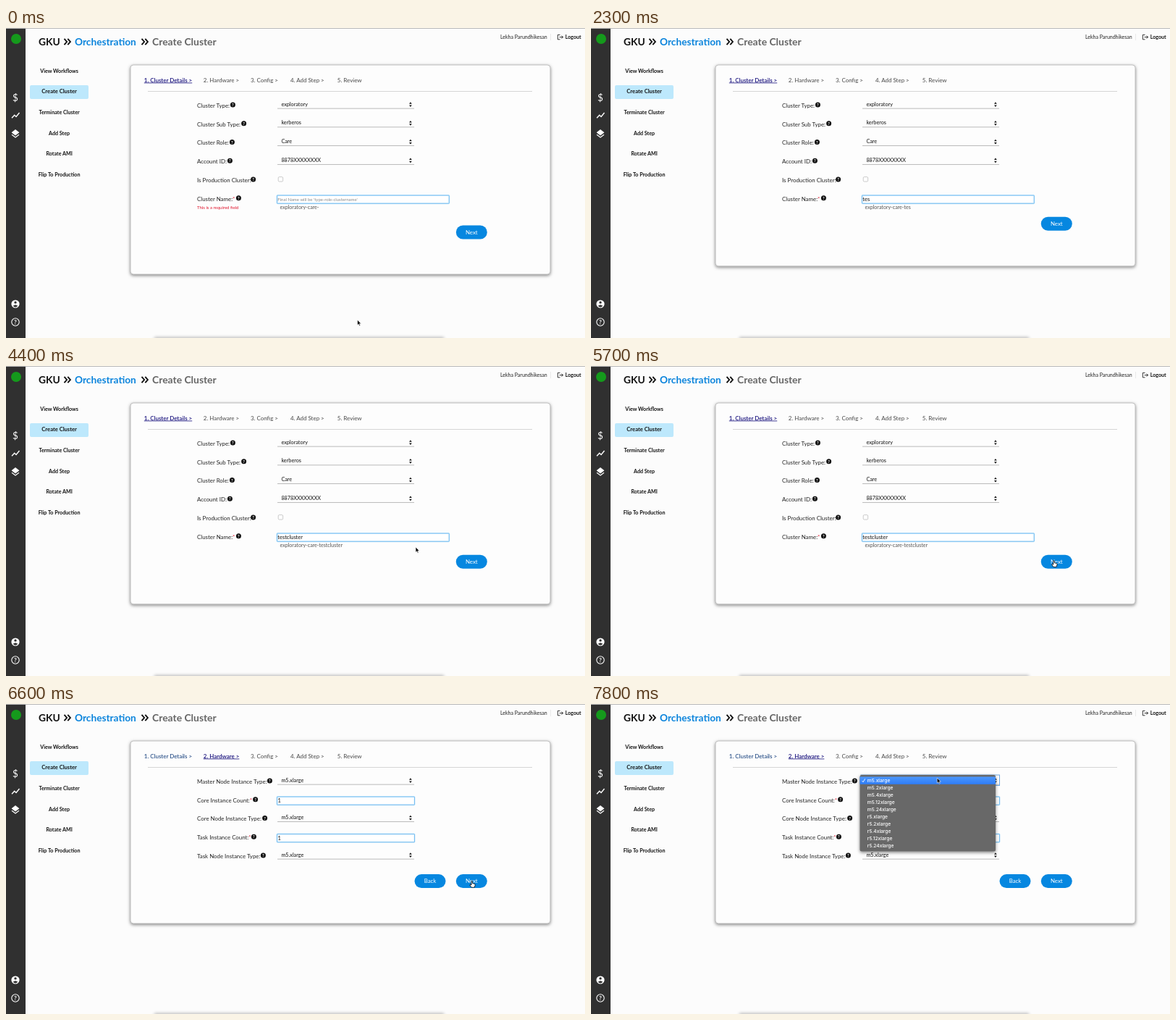
An HTML page that plays this animation: 800 px wide and 428 px high, repeating every 8 s.

```html
<!DOCTYPE html>
<html lang="en">
<head>
<meta charset="utf-8">
<title>Create Cluster</title>
<style>
html, body { margin: 0; width: 100%; height: 100%; overflow: hidden; background: #fcfcfc; }
svg { display: block; width: 800px; height: 428px; }
text { font-family: Lato, sans-serif; white-space: pre; }
</style>
</head>
<body>
<svg id="stage" viewBox="0 0 800 428" xmlns="http://www.w3.org/2000/svg">
  <defs>
    <filter id="shadow" x="-5%" y="-10%" width="110%" height="120%">
      <feDropShadow dx="0" dy="1.5" stdDeviation="2.2" flood-color="#000" flood-opacity=".5"/>
    </filter>
    <filter id="soft" x="-10%" y="-300%" width="120%" height="700%"><feGaussianBlur stdDeviation="2"/></filter>
    <linearGradient id="pick" x2="0" y2="1">
      <stop stop-color="#4b97fc"/><stop offset="1" stop-color="#2f7df6"/>
    </linearGradient>
  </defs>
</svg>
<script>
const LOOP = 8000, STEP = 100, PITCH = 25.75;
const NS = 'http://www.w3.org/2000/svg';
const stage = document.getElementById('stage');

function add(parent, tag, attrs = {}, content) {
  const el = document.createElementNS(NS, tag);
  for (const k in attrs) el.setAttribute(k, attrs[k]);
  if (content !== undefined) el.textContent = content;
  parent.appendChild(el);
  return el;
}
const group = (parent = stage) => add(parent, 'g');
const rect = (p, x, y, width, height, fill, more) => add(p, 'rect', { x, y, width, height, fill, ...more });
const path = (p, d, more) => add(p, 'path', { d, ...more });
const text = (p, x, y, size, fill, str, more) => add(p, 'text', { x, y, 'font-size': size, fill, ...more }, str);
const show = (el, on) => el.setAttribute('display', on ? 'inline' : 'none');
const BOLD = { 'font-weight': 700 };
const MID = { 'text-anchor': 'middle' };

// Page frame
function drawSidebar() {
  const g = group();
  rect(g, 0, 0, 27, 428, '#303030');
  add(g, 'circle', { cx: 14, cy: 15, r: 7, fill: '#159a1c' });
  text(g, 13, 100.5, 13.5, '#fff', '$', MID);
  path(g, 'M8 124.2L11.7 120.2 14 122.4 18.5 117', { fill: 'none', stroke: '#fff', 'stroke-width': 1.4 });
  path(g, 'M13 140L18.4 144.2 13 148.4 7.6 144.2Z', { fill: '#fff' });
  path(g, 'M8 147.2L13 151 18 147.2', { fill: 'none', stroke: '#fff', 'stroke-width': 1.2 });
  add(g, 'circle', { cx: 13, cy: 381, r: 5.6, fill: '#fff' });
  add(g, 'circle', { cx: 13, cy: 378.9, r: 1.7, fill: '#303030' });
  path(g, 'M9.7 383.8Q13 380.6 16.3 383.8Q13 387 9.7 383.8Z', { fill: '#303030' });
  add(g, 'circle', { cx: 13, cy: 406, r: 5.2, fill: 'none', stroke: '#fff', 'stroke-width': 1.1 });
  text(g, 13, 409, 8.4, '#fff', '?', { ...MID, ...BOLD });
}

function drawHeader() {
  const g = group();
  rect(g, 0, 0, 800, 1, '#b9b9b9');
  rect(g, 205, 427, 400, 4, '#000', { opacity: .3, filter: 'url(#soft)' });
  text(g, 45, 23.6, 13.8, '#111', 'GKU', BOLD);
  text(g, 95, 23.6, 13.7, '#0b84dc', 'Orchestration', BOLD);
  text(g, 202, 23.6, 13.9, '#666', 'Create Cluster', BOLD);
  for (const x of [80.5, 187.5])
    path(g, `M${x} 14.8l3.6 4.2-3.6 4.2m4.8-8.4l3.6 4.2-3.6 4.2`, { fill: 'none', stroke: '#111', 'stroke-width': 1.9 });
  text(g, 683, 14.9, 7, '#222', 'Lekha Parundhikesan');
  rect(g, 752, 8, .6, 9, '#ddd');
  path(g, 'M765.5 9.4H762.3V15.8H765.5M764.6 12.6H769.4M767.6 10.6L769.6 12.6 767.6 14.6', { fill: 'none', stroke: '#222', 'stroke-width': .9 });
  text(g, 772.8, 14.9, 7.1, '#111', 'Logout', BOLD);

  rect(g, 33, 79, 81, 19, '#bde8fc', { rx: 2 });
  ['View Workflows', 'Create Cluster', 'Terminate Cluster', 'Add Step', 'Rotate AMI', 'Flip To Production']
    .forEach((s, i) => text(g, 73.6, 61.8 + i * 28.6, i === 1 ? 7.6 : 7.15, '#111', s, { ...MID, ...BOLD }));
}

// Form parts
function label(g, row, str, iconX, required) {
  const y = 109.9 + row * PITCH;
  const el = text(g, 264, y, 7.9, '#222', str);
  if (required) add(el, 'tspan', { fill: '#e0142c' }, '*');
  add(g, 'circle', { cx: iconX, cy: y - 3.8, r: 3.5, fill: '#111' });
  text(g, iconX, y - 1.7, 5.8, '#fff', '?', { ...MID, ...BOLD });
}
function select(g, row, str) {
  const y = 105 + row * PITCH;
  text(g, 380.4, y + 2.7, 7.25, '#111', str);
  rect(g, 375, y + 5.7, 189, .8, '#aaa');
  path(g, `M557 ${y - .2}l1.9-2.6 1.9 2.6zm0 1.6l1.9 2.6 1.9-2.6z`, { fill: '#111' });
}
function input(g, row, width) {
  const y = 102.3 + row * PITCH;
  rect(g, 374.5, y, width, 11.2, '#fff', { stroke: '#d3ecfc', 'stroke-width': 2, rx: .8 });
  rect(g, 374.5, y, width, 11.2, 'none', { stroke: '#62b4ee', 'stroke-width': .8, rx: .5 });
}
function button(g, x, str) {
  rect(g, x, -9.5, 43, 19, '#0687e0', { rx: 9.5 });
  text(g, x + 21.5, 2.7, 7.9, '#fff', str, MID);
}

drawSidebar();
drawHeader();
const card = rect(stage, 172, 51, 580, 289, '#fdfdfd', { rx: 4, stroke: '#999', 'stroke-width': .6, filter: 'url(#shadow)' });
rect(stage, 196, 87, 531, .8, '#ccc');

const tabs = [[190.8, '1. Cluster Details >'], [272.8, '2. Hardware >'], [338, '3. Config >'], [393, '4. Add Step >'], [457.8, '5. Review']]
  .map(([x, s]) => text(stage, x, 74.5, 7.95, '#555', s));

// Step one: details
const details = group();
[['Cluster Type:', 313.4, 'exploratory'], ['Cluster Sub Type:', 328.6, 'kerberos'],
 ['Cluster Role:', 312.4, 'Care'], ['Account ID:', 309.4, '8878XXXXXXXX']]
  .forEach(([s, x, value], i) => { label(details, i, s, x); select(details, i, value); });
label(details, 4, 'Is Production Cluster:', 341.6);
rect(details, 376.2, 205.6, 6.4, 6.4, '#fff', { rx: 1.4, stroke: '#b5b5b5', 'stroke-width': .7 });
label(details, 5, 'Cluster Name:', 321.4, true);
input(details, 5, 237.8);
const error = text(details, 264, 250.1, 6, '#e0142c', 'This is a required field');
const hint = text(details, 375.3, 239, 6, '#888', "Final Name will be 'type-role-clustername'");
const typed = text(details, 375.3, 239.2, 7.5, '#111', '');
const finalName = text(details, 378.5, 250, 7.08, '#555', '');
const caret = rect(details, 375, 232.2, .8, 9, '#111');

// Step two: hardware
const hardware = group();
[['Master Node Instance Type:', 364.4], ['Core Instance Count:', 344.6, true], ['Core Node Instance Type:', 357.6],
 ['Task Instance Count:', 342.4, true], ['Task Node Instance Type:', 355.4]]
  .forEach(([s, x, count], i) => {
    label(hardware, i, s, x, count);
    if (count) {
      input(hardware, i, 190);
      text(hardware, 375.6, 110.4 + i * PITCH, 7.5, '#111', '1');
    } else select(hardware, i, 'm5.xlarge');
  });

const buttons = group();
button(buttons, 621.8, 'Next');
const back = group(buttons);
button(back, 564.5, 'Back');

// Open list of instance types
const menu = group();
rect(menu, 373, 98, 191.5, 14.5, 'none', { stroke: '#6ea8e2', 'stroke-width': 1 });
rect(menu, 371.5, 98, 187.5, 105.5, '#686868', { rx: 2.5, filter: 'url(#shadow)' });
rect(menu, 371.5, 100.4, 187.5, 10.4, 'url(#pick)');
path(menu, 'M374.6 106l1.4 1.8 2.6-4.4', { fill: 'none', stroke: '#fff', 'stroke-width': .9 });
['m5', 'r5'].forEach((family, f) => ['', 2, 4, 12, 24].forEach((n, i) =>
  text(menu, 381.8, 108 + (f * 5 + i) * 10.02, 6.7, '#fff', `${family}.${n}xlarge`,
    { style: 'font-family: Inter, sans-serif', 'font-weight': 500 })));

// Mouse pointers
const pointer = group();
const arrow = path(pointer, 'M0 0V7.2L1.7 5.7 2.8 8.2 4 7.7 2.9 5.2H5.1Z', { fill: '#000', stroke: '#fff', 'stroke-width': .6 });
const beam = path(pointer, 'M-1.5 -4.5Q0 -4.5 0 -3.5V3.5Q0 4.5 -1.5 4.5M1.5 -4.5Q0 -4.5 0 -3.5M0 3.5Q0 4.5 1.5 4.5', { fill: 'none', stroke: '#333', 'stroke-width': .7 });
const hand = path(pointer, 'M-.7 .7Q0 -.4 .7 .7V3.4L4 4.4Q4.8 4.8 4.4 6.4L3.6 9.2H-.6L-2.8 6Q-2.8 4.8 -1.8 5.2L-.7 6Z', { fill: '#fff', stroke: '#000', 'stroke-width': .8 });

const TRACK = [[0, 485.5, 403], [700, 391, 237], [900, 391, 237], [1000, 384, 237], [4000, 384, 237],
  [4400, 566, 250], [4900, 638.6, 266.5], [5100, 639.5, 268.2], [6100, 639.5, 268.2],
  [6600, 643.7, 244], [7050, 643.7, 244], [7600, 478.2, 102]];
const KEYS = [[1700, 't'], [1800, 'es'], [2500, 't'], [2700, 'c'], [2900, 'l'], [3100, 'u'],
  [3400, 's'], [3500, 't'], [3700, 'e'], [3800, 'r']];
const CLICK = 900, SUBMIT = 5800, OPEN = 7700;

function pointerAt(t) {
  const i = TRACK.findIndex(k => k[0] > t);
  if (i < 0) return TRACK[TRACK.length - 1].slice(1);
  const [t0, x0, y0] = TRACK[i - 1], [t1, x1, y1] = TRACK[i];
  const u = (t - t0) / (t1 - t0), e = u * u * (3 - 2 * u);
  return [x0 + (x1 - x0) * e, y0 + (y1 - y0) * e];
}

function drawPointer(t, buttonY) {
  const [x, y] = pointerAt(t);
  const onField = t < SUBMIT && x > 374 && x < 613 && y > 230 && y < 243;
  const onNext = x > 622 && x < 665 && Math.abs(y - buttonY) < 10;
  pointer.setAttribute('transform', `translate(${x} ${y})`);
  show(pointer, t < 1300 || t >= 4100);
  show(beam, onField);
  show(hand, onNext);
  show(arrow, !onField && !onNext);
}

function render(t) {
  const done = KEYS.filter(k => k[0] <= t);
  const name = done.map(k => k[1]).join('');
  const second = t >= SUBMIT;
  const buttonY = second ? 244.6 : name ? 270.3 : 282;

  card.setAttribute('height', second ? 252 : name ? 277.8 : 289);
  buttons.setAttribute('transform', `translate(0 ${buttonY})`);
  show(details, !second);
  show(hardware, second);
  show(back, second);
  show(menu, t >= OPEN);
  show(error, !name);
  show(hint, !name);
  typed.textContent = name;
  finalName.textContent = 'exploratory-care-' + name;

  const since = t - (done.length ? done[done.length - 1][0] : CLICK);
  show(caret, since >= 0 && Math.floor(since / 500) % 2 === 0);
  if (!second) caret.setAttribute('x', 375.2 + (name ? typed.getComputedTextLength() : 0));

  tabs.forEach((tab, i) => {
    const active = i === (second ? 1 : 0);
    tab.setAttribute('fill', active ? '#17107c' : i === 0 ? '#1c4580' : '#555');
    tab.setAttribute('font-weight', active ? 600 : 500);
    tab.setAttribute('text-decoration', active ? 'underline' : 'none');
  });
  drawPointer(t, buttonY);
}

const start = performance.now();
function tick() {
  const t = (performance.now() - start) % LOOP;
  render(Math.floor(t / STEP) * STEP);
  requestAnimationFrame(tick);
}
tick();
</script>
</body>
</html>
```
